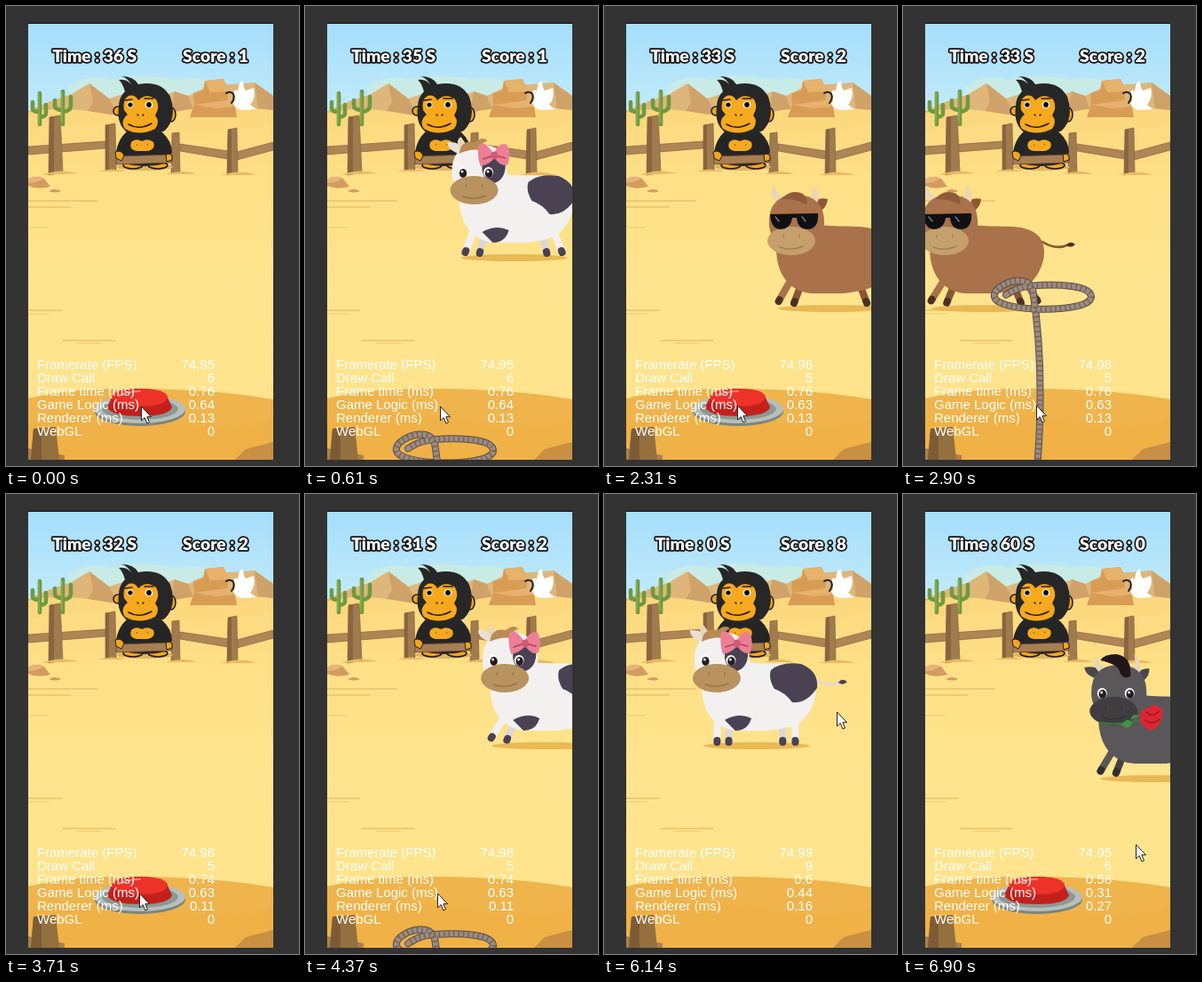
Write an HTML page that moves like this. It is 330x517 px and loops after 6.95 s.

```html
<!DOCTYPE html>
<html lang="en">
<head>
<meta charset="utf-8">
<title>Desert lasso game</title>
<style>
html, body { margin: 0; width: 100%; height: 100%; overflow: hidden; background: #333; }
svg { display: block; width: 100vw; height: 100vh; }
.title { font: 900 19.3px Lato, "Open Sans", sans-serif; text-anchor: middle; fill: #fff; stroke: #151515; stroke-width: 3.4px; stroke-linejoin: round; paint-order: stroke; }
.stats { font: 15px "Liberation Sans", Arial, sans-serif; fill: #fff; }
.line { fill: none; stroke-linecap: round; stroke-linejoin: round; }
</style>
</head>
<body>
<svg viewBox="0 0 330 517">
  <defs>
    <linearGradient id="sky" x2="0" y2="1"><stop stop-color="#a5defc"/><stop offset="1" stop-color="#c3ebf9"/></linearGradient>
    <linearGradient id="sand" x2="0" y2="1"><stop stop-color="#fbd67c"/><stop offset=".2" stop-color="#fee086"/><stop offset=".5" stop-color="#fee48e"/><stop offset="1" stop-color="#fee38b"/></linearGradient>
    <clipPath id="screen"><path d="M25 20H301V510H25Z"/></clipPath>
    <path id="rope" d="M151 515C157 440 155 370 146 313C141 298 119 302 107 312C94 325 112 333 150 335C188 336 212 330 212 321C211 309 178 306 143 309C131 310 124 314 116 319"/>
  </defs>
  <path d="M0 0H330V517H0Z" fill="#333"/>
  <path d="M25 19H301V20H25Z" fill="#111"/>
  <g clip-path="url(#screen)">
    <path d="M25 20H301V125H25Z" fill="url(#sky)"/>
    <path d="M70 90Q90 76 120 83Q150 74 190 83Q225 78 240 90V110H70Z" fill="#c9ebe6"/>
    <path d="M25 118L50 107L72 100L94 87L116 104L132 99L160 108L190 96L205 101L228 90L280 86L301 101V130H25Z" fill="#dfb67a"/>
    <path d="M94 87L116 104L128 125H88L98 108ZM280 86L301 101V125H285ZM190 96L205 101L214 125H184Z" fill="#cfa269"/>
    <path d="M25 120Q60 112 105 120T190 119T301 117V510H25Z" fill="url(#sand)"/>
    <path d="M207 125L212 111L211 98L222 95L224 84L245 82L251 96L249 106L258 113L260 125Z" fill="#d89c55"/>
    <path d="M224 84L245 82L251 96L230 97ZM212 111L249 106L258 113L236 115Z" fill="#e6b26c"/>
    <path d="M25 142Q80 128 160 138T301 132V149Q210 142 130 153T25 153Z" fill="#fddb82"/>
    <g class="line" stroke="#6f9a40" stroke-width="4.6">
      <path d="M38 98V133M30 108V115Q30 119 38 119M45 111V121Q45 124 38 125M64 96V133M55 106V112Q55 117 64 117M73 102V112Q73 118 64 119"/>
      <path d="M37 98V132M63 97V132" stroke="#8fb255" stroke-width="1.2"/>
    </g>
    <path d="M257 99Q256 92 261 96Q262 85 267 84Q267 91 270 95L279 92Q282 103 275 111L282 116L268 117Q259 117 256 110Q260 104 257 99Z" fill="#fff"/>
    <path class="line" d="M248 98Q253 95 256 99Q258 104 254 109" stroke="#222" stroke-width="2"/>
    <g fill="#af8556" stroke="#876342" stroke-width=".7">
      <path d="M25 158L112 152V160L25 167ZM196 155L250 163V172L196 163ZM260 164L301 153V162L260 173Z"/>
      <path d="M49 125L61 123L64 187L48 190ZM112 134L123 132L124 184L112 185ZM187 143L195 142L196 187L186 188ZM250 139L260 137L261 188L249 190Z" fill="#a17b4e"/>
      <path d="M49 125L54 124L54 189L48 190ZM112 134L116 133V185H112ZM250 139L254 138V189L249 190Z" fill="#88653f" stroke="none"/>
    </g>
    <path d="M40 190Q60 182 82 188ZM104 186Q120 181 136 186ZM180 189Q200 183 214 189ZM242 190Q264 183 282 190Z" fill="#e8ba64"/>

    <g id="monkey">
      <ellipse cx="156" cy="181" rx="32" ry="4" fill="#e2b45e"/>
      <g fill="#f5a51c" stroke="#171717" stroke-width="1.5">
        <circle cx="126" cy="118" r="5"/><ellipse cx="186" cy="122" rx="5" ry="8"/>
        <ellipse cx="143" cy="179" rx="11" ry="4"/><ellipse cx="171" cy="179" rx="11" ry="4"/>
      </g>
      <path d="M136 141Q126 150 124 164L130 170L133 177Q156 183 180 177L182 170L187 165Q187 152 176 142Z" fill="#252525"/>
      <path d="M134 96Q131 86 127 83Q136 82 141 88Q137 81 130 79Q144 79 149 88Q175 83 185 102Q193 126 179 140Q160 150 138 143Q124 134 127 113Q127 103 134 96Z" fill="#272727"/>
      <path d="M149 106Q145 99 138 101Q131 105 133 117Q136 121 137 122Q128 129 134 138Q150 147 168 138Q174 130 168 123Q174 113 169 105Q158 97 149 106Z" fill="#f6a91e"/>
      <path class="line" d="M134 106L142 105M156 104L166 104M138 133Q150 140 164 132M148 122L149 123M154 123L155 122" stroke="#271c12" stroke-width="1.5"/>
      <ellipse cx="140" cy="111" rx="3.4" ry="3.6" fill="#fff"/><ellipse cx="161" cy="111" rx="4.4" ry="3.8" fill="#fff"/>
      <circle cx="140" cy="111" r="2.6"/><circle cx="161" cy="111" r="2.9"/>
      <path d="M153 152Q146 148 141 153Q138 161 147 163H159Q169 161 166 153Q160 148 153 152Z" fill="#f6a91e"/>
      <path d="M147 156h1M159 156h1" stroke="#765015" stroke-width="1.5"/>
      <path d="M124 169L187 167V176L124 178Z" fill="#a77f53" stroke="#6d4a2d" stroke-width=".8"/>
      <path d="M123 164Q130 161 133 168L130 174L124 171ZM180 167Q188 164 187 173L181 175Z" fill="#f5a51c" stroke="#222"/>
    </g>

    <path d="M25 195Q33 189 43 194L50 203Q35 207 25 202Z" fill="#d49b60"/><path d="M25 194Q34 190 42 194L34 198L25 199Z" fill="#e6b479"/>
    <path d="M48 208Q55 204 62 208Q56 211 48 208Z" fill="#d49b60"/>
    <path class="line" d="M25 219H103M25 226H73M25 342H62M64 376H123" stroke="#e9c26c" stroke-width="1.6"/>
    <path class="line" d="M25 249H47M25 346H48M80 379H108" stroke="#f6d57c" stroke-width="2"/>
    <path d="M25 441Q75 429 140 430Q230 430 301 442V510H25Z" fill="#efb44c"/>
    <path d="M25 468Q90 450 180 466T301 463V510H25Z" fill="#f0b146"/>
    <path d="M258 510L270 498L301 490V510Z" fill="#c98f42"/>
    <path d="M25 497L66 505V510H25Z" fill="#a98049"/><path d="M31 475L56 473L60 510H28Z" fill="#94703f"/><path d="M31 475L40 474V510H28Z" fill="#7c5c36"/>

    <g id="button">
      <ellipse cx="151" cy="456" rx="51" ry="16" fill="#7c8580"/>
      <ellipse cx="151" cy="453" rx="51" ry="16" fill="#b6bfb9"/>
      <ellipse cx="151" cy="453" rx="43" ry="12" fill="#8d9892"/>
      <path d="M114 451L120 438Q132 430 151 430T181 438L187 451Q184 461 151 461T114 451Z" fill="#c3201c"/>
      <path d="M119 440Q121 430 151 430T182 440Q180 450 151 450T119 440Z" fill="#ec3229"/>
      <path class="line" d="M127 438Q137 433 151 433" stroke="#ff8170" stroke-width="2"/>
    </g>
    <g id="herd"></g>
    <g id="lasso" class="line">
      <use href="#rope" stroke="#5a4d46" stroke-width="8"/>
      <use href="#rope" stroke="#9c8b80" stroke-width="6"/>
      <use href="#rope" stroke="#72635a" stroke-width="6" stroke-dasharray="1.5 4" stroke-linecap="butt"/>
    </g>
    <g class="title"><text id="time" x="99.7" y="62.7"/><text id="score" x="236" y="62.7"/></g>
    <g id="stats" class="stats"></g>
  </g>
  <path id="cursor" d="M0 0V16L3.7 12.6L6.4 19L9 17.9L6.3 11.7H11Z" fill="#fff" stroke="#222" stroke-width="1"/>
</svg>
<script>
const LOOP = 6950, STEP = 73.2, SPEED = 0.28, PULL = 340, ROPE_SPEED = 0.58, STRIDE = 636;
const $ = id => document.getElementById(id);
const show = (el, on) => el.setAttribute('display', on ? 'inline' : 'none');
const move = (el, x, y) => el.setAttribute('transform', `translate(${x} ${y})`);
const at = (list, t) => list.filter(k => k[0] <= t).pop();
const oval = (x, y, rx, ry, fill) => `<ellipse cx="${x}" cy="${y}" rx="${rx}" ry="${ry}" fill="${fill}"/>`;
const shape = (d, fill) => `<path d="${d}" fill="${fill}"/>`;
const line = (d, stroke, w) => `<path class="line" d="${d}" stroke="${stroke}" stroke-width="${w}"/>`;
const eye = x => oval(x, 187, 5.5, 6, '#fff') + oval(x + .5, 188, 4.2, 5, '#241d1d') + oval(x - .5, 186, 1.4, 1.6, '#fff');

const BODY = 'M10 215C10 185 40 188 70 190C95 192 120 187 134 203C144 217 138 240 124 254C118 262 100 264 85 266H50C25 264 10 245 10 215Z';
const HORNS = shape('M14 166Q0 156 8 145Q10 157 22 159ZM44 161Q54 158 50 143Q63 155 54 168Z', '#e8d6b5');
// far pair first: hip position and share of the swing
const LEGS = [[41, .7], [101, -.7], [28, 1], [115, -1]];

const kinds = {
  cow: {
    y: 0, fur: '#f3f1f0', far: '#dcd8d8', hoof: '#4a4153', muzzle: '#b8925f',
    spots: shape('M88 198Q100 188 122 191Q142 199 140 218Q128 236 112 234Q104 223 92 219Q85 208 88 198ZM36 254Q52 245 66 252Q62 266 48 266Z', '#4a4153'),
    ears: shape('M14 168Q-4 162 -3 153Q10 152 20 162Z', '#eadfd6') + shape('M10 159Q6 150 12 147L20 158Z', '#e8d6b5'),
    face: shape('M36 165Q54 160 62 174Q64 194 50 199Q38 198 36 184Z', '#4a4153') + eye(14) + eye(43),
    extra: shape('M10 166Q12 150 28 153Q36 146 42 151L36 155Q44 158 44 164Q26 158 10 166Z', '#b88b55') +
      shape('M49 166Q38 150 32 156Q30 168 34 180Q44 178 50 171Q58 182 65 178Q69 165 64 156Q56 152 49 166Z', '#ec7f95') +
      line('M46 169L37 172M54 169L62 171', '#a8465f', 1.5) + oval(50, 168, 4, 4.5, '#cf5a75')
  },
  brown: {
    y: 57, fur: '#a9724a', far: '#865636', hoof: '#4a3024', muzzle: '#c5a06c', spots: '',
    ears: shape('M48 168Q56 157 68 160Q66 174 52 176Z', '#8e5836') + HORNS,
    face: '', extra: shape('M16 160Q26 148 40 154Q46 160 44 166Q30 159 16 160Z', '#8f5b3a') +
      shape('M3 177L57 176Q58 193 46 194Q34 194 33 181H28Q26 194 14 194Q4 193 3 177Z', '#101012') +
      line('M9 180L13 185M39 180L43 185', '#737780', 1.5)
  },
  grey: {
    y: 37, fur: '#5a575a', far: '#434044', hoof: '#302d32', muzzle: '#403c40', spots: '',
    ears: shape('M12 171Q-4 169 -6 158Q8 155 18 165ZM50 170Q54 159 67 159Q68 171 53 177Z', '#4a474b') + HORNS,
    face: eye(14) + eye(45),
    extra: shape('M12 150Q16 143 30 143Q48 146 46 168Q38 172 34 164Q34 155 12 150Z', '#211719') +
      line('M12 220Q32 224 58 217', '#397d3b', 2) + shape('M36 222Q44 212 48 221Q42 230 36 222ZM46 217Q48 208 56 213Z', '#3f9445') +
      shape('M57 218Q55 207 64 204Q76 196 82 206Q83 222 70 229Q60 226 57 218Z', '#dc2732') + line('M64 208Q70 216 78 207M62 217Q70 224 79 216', '#9e1723', 1.5)
  }
};

function animal(k) {
  const legs = LEGS.map(([x], i) =>
    `<g class="leg">${line(`M${x} 248V277`, i < 2 ? k.far : k.fur, 8)}${line(`M${x} 277V279`, k.hoof, 8)}</g>`);
  return `<g class="shade">${oval(72, 283, 60, 4, '#e9b955')}</g>` +
    line('M137 208Q152 218 167 211', k.far, 2.5) + shape('M164 212Q168 206 174 211Q169 216 164 212Z', k.hoof) +
    legs.join('') + shape(BODY, k.fur) + k.spots + k.ears +
    shape('M2 190Q0 156 32 155Q65 156 64 188Q61 214 30 215Q4 212 2 190Z', k.fur) + k.face +
    oval(27, 207, 27, 16, k.muzzle) + line('M18 201V203M36 201V203M14 214Q27 219 40 213', '#00000033', 1.5) + k.extra;
}

const herd = {};
for (const name in kinds) {
  $('herd').insertAdjacentHTML('beforeend', `<g id="${name}">${animal(kinds[name])}</g>`);
  const el = $(name);
  herd[name] = { el, legs: el.querySelectorAll('.leg'), shade: el.querySelector('.shade') };
}

const runs = [
  [50, 1210, 50, 'cow', 870], [1870, 3570, 1880, 'brown'], [3940, 5030, 3980, 'cow', 4690],
  [5550, 6210, 5386, 'cow'], [6360, LOOP, 6512, 'grey']
];
const throws = [870, 2895, 4690];
const clock = [[0, 36], [50, 35], [1000, 34], [1940, 33], [2940, 32], [3940, 31], [4940, 30], [5550, 1], [5900, 0], [6210, 60]];
const scores = [[0, 1], [1210, 2], [5030, 3], [5550, 8], [6210, 0]];
const pointer = [[0, 152, 450], [1000, 151, 450], [1900, 150, 449], [4000, 149, 449], [5550, 262, 245]];
const readings = [
  [0, 74.95, 6, .76, .64, .13], [1210, 74.94, 5, .78, .66, .12], [1720, 74.97, 5, .77, .64, .12],
  [2220, 74.98, 5, .76, .63, .13], [3710, 74.98, 5, .74, .63, .11], [5180, 74.99, 5, .76, .64, .12],
  [5550, 74.99, 9, .6, .44, .16], [6210, 74.95, 6, .58, .31, .27]
];
const labels = ['Framerate (FPS)', 'Draw Call', 'Frame time (ms)', 'Game Logic (ms)', 'Renderer (ms)', 'WebGL'];
$('stats').innerHTML = labels.map((s, i) =>
  `<text x="35" y="${408 + 15 * i}">${s}</text><text class="value" x="235" y="${408 + 15 * i}" text-anchor="end">0</text>`).join('');
const values = document.querySelectorAll('.value');

function draw(t) {
  // movement advances in even steps, like a screen recording
  const now = 50 + STEP * Math.floor((t - 50) / STEP + .2);
  const peak = throws.find(p => Math.abs(t - p) < PULL);
  const drop = Math.abs(now - peak) * ROPE_SPEED;
  show($('lasso'), peak);
  if (peak) move($('lasso'), 0, drop);
  show($('button'), !peak && (t < 5550 || t >= 6210));

  for (const name in herd) show(herd[name].el, false);
  const run = runs.find(r => t >= r[0] && t < r[1]);
  if (run) {
    const [, , entry, name, caught = Infinity] = run, { el, legs, shade } = herd[name];
    const age = Math.min(now, caught) - entry;
    show(el, true);
    show(shade, now < caught);
    move(el, 307 - SPEED * age, kinds[name].y + (now > caught && peak ? drop : 0));
    const swing = 16 * (1 + Math.cos(2 * Math.PI * (age - 385) / STRIDE));
    legs.forEach((leg, i) => leg.setAttribute('transform', `rotate(${swing * LEGS[i][1]} ${LEGS[i][0]} 248)`));
  }

  $('time').textContent = `Time : ${at(clock, t)[1]} S`;
  $('score').textContent = `Score : ${at(scores, t)[1]}`;
  at(readings, t).slice(1).forEach((v, i) => values[i].textContent = v);
  const [, x, y] = at(pointer, t);
  const glide = Math.max(0, Math.min(1, (now - 6300) / 300));
  move($('cursor'), x + .5, y + 149 * glide * glide * (3 - 2 * glide));
}

const begin = performance.now();
(function tick() {
  draw((performance.now() - begin) % LOOP);
  requestAnimationFrame(tick);
})();
</script>
</body>
</html>
```
